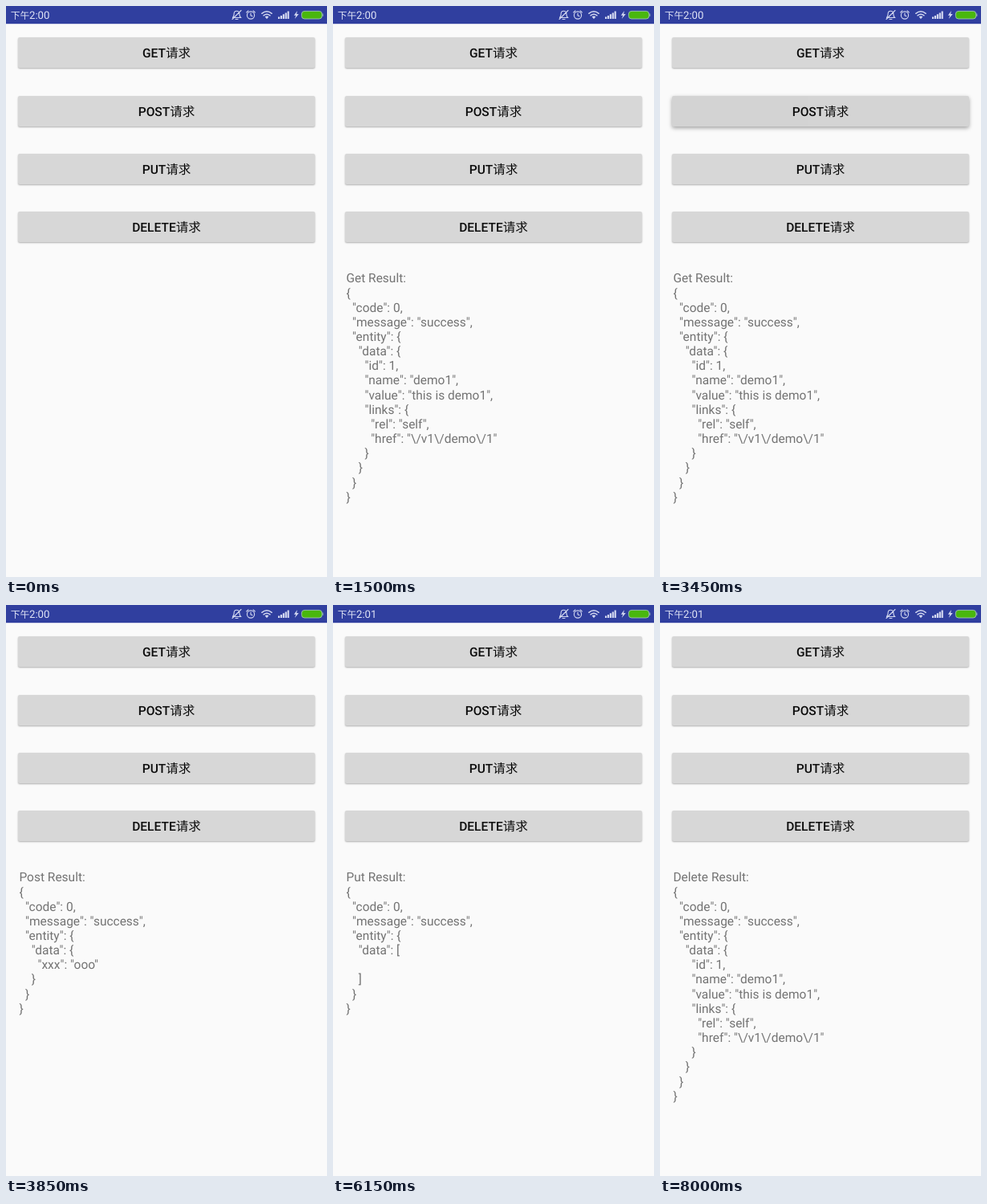
Write an HTML page that moves like this. It is 400 px wide and 711 px high and loops after 8950 ms.

```html
<!DOCTYPE html>
<html lang="zh">
<head>
<meta charset="utf-8">
<title>REST demo</title>
<style>
  :root { --loop: 8950ms; }
  html, body { margin: 0; width: 100%; height: 100%; overflow: hidden; background: #fafafa; }
  body {
    position: relative; text-rendering: geometricPrecision;
    font-family: Roboto, "Noto Sans CJK SC", "Noto Sans CJK", sans-serif;
  }

  .status { position: absolute; left: 0; top: 0; }
  .status text { font-size: 13.2px; fill: #dfe3f5; }
  .status .cjk { font-size: 11.8px; }

  .button {
    position: absolute; left: 15px; top: calc(39.3px + 72.33px * var(--row)); width: 370px; height: 38px;
    border-radius: 2px; background: #d7d7d7; color: #0c0c0c;
    font-size: 15.55px; font-weight: 500; line-height: 40px; text-align: center;
    overflow: hidden; isolation: isolate;
    box-shadow: 0 1px 2px rgba(0, 0, 0, .3);
    animation: raise var(--loop) var(--press) infinite;
  }
  .button span { font-weight: 400; }
  .button::before {
    content: ""; position: absolute; z-index: -1; left: -100px; top: -331px;
    width: 700px; height: 700px; border-radius: 50%; background: #000; opacity: 0;
    animation: ripple var(--loop) var(--press) infinite;
  }
  @keyframes raise {
    0%, 3.3%, 100% { box-shadow: 0 1px 2px rgba(0, 0, 0, .3); }
    1.1%, 2.1% { box-shadow: 0 2px 5px rgba(0, 0, 0, .36); }
  }
  @keyframes ripple {
    0% { transform: scale(.05); opacity: 0; }
    .6% { opacity: .04; }
    2% { transform: scale(1); opacity: .015; }
    3.3%, 100% { transform: scale(1); opacity: 0; }
  }

  .result {
    position: absolute; left: 16.4px; top: 330.4px; margin: 0; opacity: 0;
    font: 15.5px/18.15px Roboto, sans-serif; color: #737373; white-space: pre;
  }
  .result, .clock { animation: var(--show) var(--loop) step-end infinite; }
  @keyframes show-get    { 0% { opacity: 0; } 16.2% { opacity: 1; } 40.2%, 100% { opacity: 0; } }
  @keyframes show-post   { 0% { opacity: 0; } 40.2% { opacity: 1; } 63.9%, 100% { opacity: 0; } }
  @keyframes show-put    { 0% { opacity: 0; } 63.9% { opacity: 1; } 86%, 100% { opacity: 0; } }
  @keyframes show-delete { 0% { opacity: 0; } 86%, 100% { opacity: 1; } }
  @keyframes show-before { 0% { opacity: 1; } 55.866%, 100% { opacity: 0; } }
  @keyframes show-after  { 0% { opacity: 0; } 55.866%, 100% { opacity: 1; } }
</style>
</head>
<body>
<svg class="status" width="400" height="23" viewBox="0 0 400 23">
  <rect width="400" height="22.2" fill="#303f9f"/>
  <text class="cjk-label" x="5.8" y="15.8"><tspan class="cjk">下午</tspan></text>
  <text class="clock" style="--show: show-before" x="29" y="15.8">2:00</text>
  <text class="clock" style="--show: show-after" x="29" y="15.8">2:01</text>
  <g fill="none" stroke="#d3d8f0" stroke-width="1.1" stroke-linecap="round">
    <path d="M282.5 14.5h10c-1.6-1.5-1.6-3-1.6-4.5 0-5-6.8-5-6.8 0 0 1.5 0 3-1.6 4.5M286 16.5h3M293 5.5l-11 11"/>
    <circle cx="305" cy="11.5" r="4.6"/>
    <path d="M305 9v2.8l2 1M299.7 8l2.3-2.2M310.3 8l-2.3-2.2"/>
    <path d="M318.8 9.3q6.2-5 12.4 0M321 11.8q4-3.2 8 0" stroke-width="1.5"/>
  </g>
  <g fill="#d3d8f0">
    <path d="M322.6 13.3q2.4-1.7 4.8 0l-2.4 2.9z"/>
    <path d="M339 13.5h2.2v2.5h-2.2zM341.9 12h2.2v4h-2.2zM344.8 10.3h2.2v5.7h-2.2zM347.7 8.5h2.2v7.5h-2.2zM350.6 6.5h2.2v9.5h-2.2z"/>
    <path d="M363 6l-4.2 5.7h2.5l-1.5 4.3 5-6h-2.7z"/>
  </g>
  <rect x="368.4" y="6.4" width="25.4" height="9.6" rx="3.6" fill="#49b70d" stroke="#a3c5b4" stroke-width=".9"/>
  <path d="M394.8 9.5v3.5" stroke="#a3c5b4"/>
</svg>

<div class="button" style="--row: 0; --press: 1220ms">GET<span>请求</span></div>
<div class="button" style="--row: 1; --press: 3320ms">POST<span>请求</span></div>
<div class="button" style="--row: 2; --press: 5470ms">PUT<span>请求</span></div>
<div class="button" style="--row: 3; --press: 7450ms">DELETE<span>请求</span></div>

<script>
  const demo = { id: 1, name: 'demo1', value: 'this is demo1', links: { rel: 'self', href: '/v1/demo/1' } };
  const results = { Get: demo, Post: { xxx: 'ooo' }, Put: [], Delete: demo };

  // Pretty-prints with escaped slashes and open empty arrays.
  function format(data) {
    return JSON.stringify({ code: 0, message: 'success', entity: { data } }, null, 2)
      .replace(/\//g, '\\/')
      .replace('[]', '[\n\n    ]');
  }

  for (const [method, data] of Object.entries(results)) {
    const pre = document.createElement('pre');
    pre.className = 'result';
    pre.style.setProperty('--show', `show-${method.toLowerCase()}`);
    pre.textContent = `${method} Result:\n${format(data)}`;
    document.body.append(pre);
  }
</script>
</body>
</html>
```
